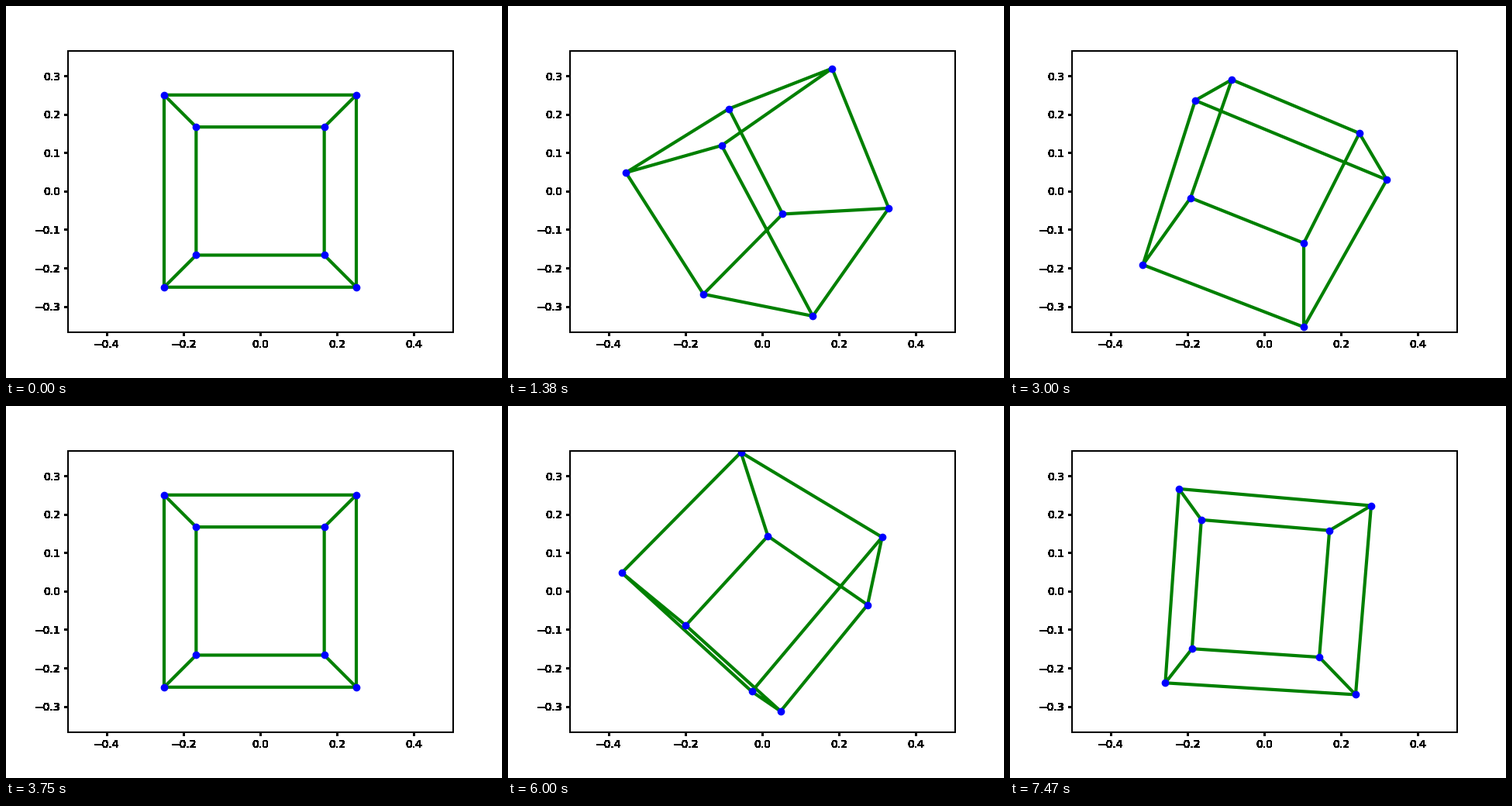
These frames come from a looping animation (640 px wide and 480 px high, 7500 ms). A matplotlib script:

```python
import itertools

import matplotlib.pyplot as plt
import numpy as np
from matplotlib.animation import FuncAnimation

W, H, DPI = 640, 480, 100
FRAMES, INTERVAL = 250, 30
CAMERA = 5

CORNERS = np.array(list(itertools.product((-1, 1), repeat=3)), float)
EDGES = [(i, j) for i, j in itertools.combinations(range(8), 2)
         if np.abs(CORNERS[i] - CORNERS[j]).sum() == 2]


def rotation(t):
    """Matrix of the unit quaternion with vector part (sin t, sin 2t, sin 3t) / 2."""
    v = np.sin(t * np.array([1, 2, 3])) / 2
    w = np.sqrt(1 - v @ v)
    x, y, z = v
    cross = np.array([[0, -z, y], [z, 0, -x], [-y, x, 0]])
    return np.eye(3) + 2 * w * cross + 2 * cross @ cross


def project(points):
    return points[:, :2] / (CAMERA + points[:, 2:])


def solid_frame(fig, ax):
    """Axes decoration with every touched pixel outside the plot area fully black."""
    patches = fig.patch, ax.patch
    for p in patches:
        p.set_visible(False)
    fig.canvas.draw()
    mask = np.asarray(fig.canvas.buffer_rgba())[..., 3] > 0
    for p in patches:
        p.set_visible(True)
    mask[59:420, 81:576] = False
    image = np.zeros((H, W, 4))
    image[..., 3] = mask
    return image


fig = plt.figure(figsize=(W / DPI, H / DPI), dpi=DPI, facecolor="white")
ax = fig.add_axes([0.125, 0.125, 0.775, 0.755])
half_height = 0.5 * (0.755 * H) / (0.775 * W)
ax.set_xlim(-0.5, 0.5)
ax.set_ylim(-half_height, half_height)

fig.figimage(solid_frame(fig, ax), origin="upper", zorder=5)

edges, = ax.plot([], [], color="green", lw=3)
dots, = ax.plot([], [], "o", color="blue", ms=6)


def update(i):
    p = project(CORNERS @ rotation(2 * np.pi * i / FRAMES).T)
    gap = np.full(2, np.nan)
    path = np.array([q for a, b in EDGES for q in (p[a], p[b], gap)])
    edges.set_data(path[:, 0], path[:, 1])
    dots.set_data(p[:, 0], p[:, 1])
    return edges, dots


anim = FuncAnimation(fig, update, frames=FRAMES, interval=INTERVAL,
                     repeat=True, repeat_delay=0)
plt.show()
```
